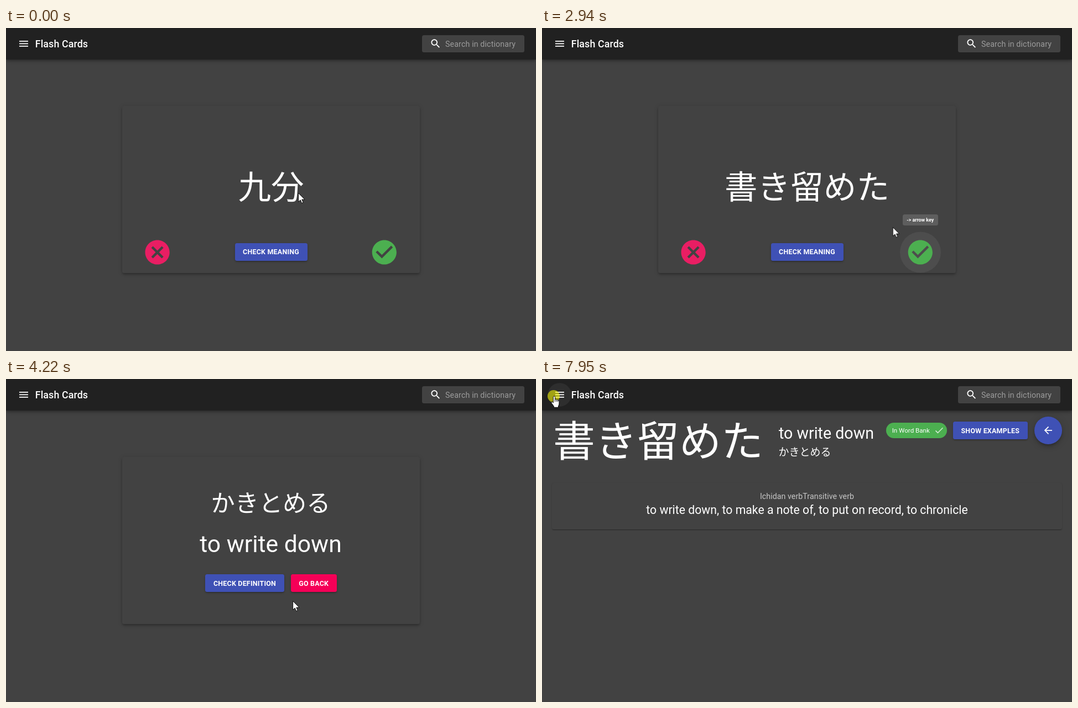
These frames come from a looping animation (958 by 584 pixels, 8000 ms). An HTML page:

```html
<!DOCTYPE html>
<html lang="ja">
<head>
<meta charset="utf-8">
<title>Flash Cards</title>
<style>
  html, body { margin: 0; width: 100%; height: 100%; overflow: hidden; background: #424242; }
  body { font-family: Roboto, sans-serif; color: #fff; }
  #stage { position: absolute; left: 0; top: 0; width: 958px; height: 584px; overflow: hidden; background: #424242; }
  #stage * { animation-duration: 8s; animation-iteration-count: infinite; animation-timing-function: linear; }
  #stage .step { animation-timing-function: step-end; }
  .layer, svg.layer { position: absolute; left: 0; top: 0; width: 958px; height: 584px; }
  .box { position: absolute; box-sizing: border-box; }
  text { fill: #fff; }
  .mid { text-anchor: middle; }
  .jp { font-family: "Noto Sans CJK JP", "Noto Sans CJK", sans-serif; }
  .word { font-size: 59.6px; }

  .bar { left: 0; top: 0; width: 958px; height: 57px; background: #212121;
    box-shadow: 0 2px 4px -1px #0003, 0 3.5px 4.5px #0002, 0 1px 9px #0002; }
  .search { left: 752px; top: 13px; width: 185px; height: 31px; border-radius: 3.5px; background: #424242; }

  /* flip card: each face is hidden once it turns past 90 degrees */
  .scene { perspective: 890px; perspective-origin: 479px 292px; animation-name: scene; }
  #stage .face { transform-origin: 479px 292px; backface-visibility: hidden;
    animation-timing-function: linear, step-end; }
  .front { animation-name: front, frontSide; }
  .back { transform: rotateY(-180deg); animation-name: back, backSide; }
  .card { left: 210px; top: 141px; width: 538px; height: 302px; border-radius: 3.5px; background: #424242;
    box-shadow: 0 2px 4px -1px #0003, 0 3.5px 4.5px #0002, 0 1px 9px #0002; }

  .btn { height: 32px; display: flex; align-items: center; justify-content: center; overflow: hidden;
    border-radius: 3.5px; background: #3f51b5; font-size: 12.44px; font-weight: 600;
    letter-spacing: .018em; white-space: nowrap;
    box-shadow: 0 2.5px 1px -2px #0003, 0 2px 2px #0002, 0 1px 4.5px #0002; }
  .ripple { position: absolute; width: 212px; height: 212px; margin: -106px; border-radius: 50%;
    background: #fff; opacity: .2; transform: scale(0); animation-name: ripple; }
  .meaning { left: 413.5px; top: 388.7px; width: 131px; animation-name: meaning; }
  .define { left: 360px; top: 353px; width: 143px; animation-name: define; }
  .goback { left: 515px; top: 353px; width: 82.5px; background: #f50057; animation-name: goback; }

  .tip { height: 19.5px; display: flex; align-items: center; justify-content: center; border-radius: 3.5px;
    background: #5e5e5e; font-size: 8.9px; font-weight: 700; white-space: nowrap; opacity: 0; }
  .tip.key { left: 652.3px; top: 336.7px; width: 63.5px; animation-name: tipKey; }
  .tip.space { left: 450.7px; top: 357px; width: 54px; animation-name: tipSpace; }

  /* definition page */
  .detail { opacity: 0; animation-name: detail; }
  .entry { opacity: 0; animation-name: entry; }
  .fab { left: 890px; top: 68px; width: 49.5px; height: 49.5px; border-radius: 50%; background: #3f51b5;
    box-shadow: 0 3px 4.5px -1px #0003, 0 5px 9px #0002, 0 1px 16px #0002; }
  .chip { left: 622px; top: 79px; width: 110px; height: 28px; border-radius: 14px; background: #4caf50; }
  .examples { left: 743px; top: 77px; width: 134.5px; }
  .senses { left: 18px; top: 188px; width: 922px; height: 84px; border-radius: 3.5px; background: #424242;
    box-shadow: 0 2px 1px -1px #0003, 0 1px 1px #0002, 0 1px 2.7px #0002; }

  .halo { fill: #fff; fill-opacity: 0; }
  .halo.ok { animation-name: haloOk; }
  .halo.menu { animation-name: haloMenu; }
  .w1 { animation-name: w1; }
  .w2 { fill-opacity: 0; animation-name: w2; }
  .w3 { fill-opacity: 0; animation-name: w3; }

  #stage .cursor { --hand: 0; animation-name: path, hand; animation-timing-function: linear, step-end; }
  .pointer { opacity: calc(1 - var(--hand)); }
  .hand { opacity: var(--hand); }
  .press { fill: #ff0; opacity: 0; animation-name: press; }

  @keyframes path {
    0%, 2.5% { transform: translate(528px, 298px); animation-timing-function: ease-in-out; }
    8.6%, 21.5% { transform: translate(686px, 418px); }
    22.25%, 33.375% { transform: translate(682px, 411px); animation-timing-function: ease-in; }
    36.75% { transform: translate(634px, 360px); }
    39.4% { transform: translate(562px, 321px); }
    42.3% { transform: translate(514px, 396px); animation-timing-function: ease-out; }
    43.4%, 54.5% { transform: translate(518px, 401px); animation-timing-function: ease-in; }
    56.4% { transform: translate(540px, 358px); }
    58.6% { transform: translate(510px, 323px); animation-timing-function: ease-out; }
    61.9%, 76.9% { transform: translate(457px, 365px); animation-timing-function: ease-in-out; }
    78.75%, 87.7% { transform: translate(464px, 418px); animation-timing-function: ease-in-out; }
    89.5%, 91.8% { transform: translate(376px, 302px); animation-timing-function: ease-in-out; }
    98.4%, 100% { transform: translate(22px, 31px); }
  }
  @keyframes hand {
    0% { --hand: 0; } 7.2% { --hand: 1; } 35.4% { --hand: 0; } 42.1% { --hand: 1; }
    47% { --hand: 0; } 55.7% { --hand: 1; } 56.9% { --hand: 0; } 60.6% { --hand: 1; }
    75.6% { --hand: 0; } 97% { --hand: 1; } 100% { --hand: 1; }
  }
  @keyframes press {
    0% { opacity: 0; } 11.5% { opacity: .56; } 12.5% { opacity: 0; }
    25.125% { opacity: .56; } 26.2% { opacity: 0; } 44.125% { opacity: .56; } 44.75% { opacity: 0; }
    73.875% { opacity: .56; } 75% { opacity: 0; } 99.375%, 100% { opacity: .56; }
  }
  @keyframes front {
    0%, 44.79% { transform: rotateY(0deg); animation-timing-function: ease; }
    52.29%, 100% { transform: rotateY(180deg); }
  }
  @keyframes back {
    0%, 44.79% { transform: rotateY(-180deg); animation-timing-function: ease; }
    52.29%, 100% { transform: rotateY(0deg); }
  }
  @keyframes frontSide { 0% { visibility: visible; } 47.03%, 100% { visibility: hidden; } }
  @keyframes backSide { 0% { visibility: hidden; } 47.03%, 100% { visibility: visible; } }
  @keyframes ripple {
    0%, 44.41% { transform: scale(0); animation-timing-function: cubic-bezier(.4, 0, .2, 1); }
    51.3% { transform: scale(1); opacity: .2; }
    54%, 100% { transform: scale(1); opacity: 0; }
  }
  @keyframes meaning { 0%, 41.9% { background: #3f51b5; } 43.4%, 100% { background: #303f9f; } }
  @keyframes define { 0%, 60.5% { background: #3f51b5; } 61.9%, 100% { background: #303f9f; } }
  @keyframes goback { 0%, 55.7%, 59%, 100% { background: #f50057; } 57% { background: #c80048; } }
  @keyframes tipKey {
    0%, 7.2% { opacity: 0; transform: scale(.75); } 8.6%, 36.9% { opacity: 1; transform: none; }
    38.8%, 100% { opacity: 0; transform: scale(.75); }
  }
  @keyframes tipSpace {
    0%, 42% { opacity: 0; transform: scale(.75); } 43.4%, 46.8% { opacity: 1; transform: none; }
    49%, 100% { opacity: 0; transform: scale(.75); }
  }
  @keyframes haloOk { 0%, 7% { fill-opacity: 0; } 8.6%, 36.8% { fill-opacity: .06; } 38.6%, 100% { fill-opacity: 0; } }
  @keyframes haloMenu { 0%, 97% { fill-opacity: 0; } 98.9%, 100% { fill-opacity: .06; } }
  @keyframes w1 { 0% { fill-opacity: 1; } 12.5%, 100% { fill-opacity: 0; } }
  @keyframes w2 { 0% { fill-opacity: 0; } 12.5% { fill-opacity: 1; } 26.2%, 100% { fill-opacity: 0; } }
  @keyframes w3 { 0% { fill-opacity: 0; } 26.2%, 100% { fill-opacity: 1; } }
  @keyframes scene { 0% { opacity: 1; } 75.6%, 100% { opacity: 0; } }
  @keyframes detail { 0% { opacity: 0; } 75.6%, 100% { opacity: 1; } }
  @keyframes entry { 0% { opacity: 0; } 85%, 100% { opacity: 1; } }
</style>
</head>
<body>
<div id="stage">

  <div class="layer scene step">
    <div class="layer face back">
      <div class="box card"></div>
      <svg class="layer" viewBox="0 0 958 584">
        <text class="jp mid" x="478.5" y="240.5" font-size="43.2">かきとめる</text>
        <text class="mid" x="478.5" y="313.5" font-size="42.67">to write down</text>
      </svg>
      <div class="box btn define">CHECK DEFINITION
        <i class="ripple" style="left:96.5px;top:11.5px;animation-delay:-5620ms"></i></div>
      <div class="box btn goback">GO BACK</div>
    </div>
    <div class="layer face front">
      <div class="box card"></div>
      <svg class="layer" viewBox="0 0 958 584">
        <g class="jp mid word">
          <text class="w1 step" x="479" y="309">九分</text>
          <text class="w2 step" x="479" y="309">会い</text>
          <text class="w3 step" x="479" y="309">書き留めた</text>
        </g>
        <circle class="halo ok" cx="684" cy="405.5" r="37"/>
        <path transform="translate(247.1 379) scale(2.21)" fill="#e91e63" d="M12 2C6.47 2 2 6.47 2 12s4.47 10 10 10 10-4.47 10-10S17.53 2 12 2zm5 13.59L15.59 17 12 13.41 8.41 17 7 15.59 10.59 12 7 8.41 8.41 7 12 10.59 15.59 7 17 8.41 13.41 12 17 15.59z"/>
        <path transform="translate(657.3 379) scale(2.21)" fill="#4caf50" d="M12 2C6.48 2 2 6.48 2 12s4.48 10 10 10 10-4.48 10-10S17.52 2 12 2zm-2 15l-5-5 1.41-1.41L10 14.17l7.59-7.59L19 8l-9 9z"/>
      </svg>
      <div class="box btn meaning">CHECK MEANING
        <i class="ripple" style="left:104.5px;top:12.5px"></i></div>
    </div>
  </div>

  <div class="layer detail step">
    <div class="box fab"></div>
    <svg class="layer" viewBox="0 0 958 584">
      <path transform="translate(904.2 82.2) scale(.889)" fill="#fff" d="M20 11H7.83l5.59-5.59L12 4l-8 8 8 8 1.41-1.41L7.83 13H20v-2z"/>
    </svg>
    <div class="layer entry step">
      <div class="box chip"></div>
      <div class="box btn examples">SHOW EXAMPLES</div>
      <div class="box senses"></div>
      <svg class="layer" viewBox="0 0 958 584">
        <text class="jp" x="20" y="140" font-size="76">書き留めた</text>
        <text x="428" y="108" font-size="28.6">to write down</text>
        <text class="jp" x="427.5" y="138.5" font-size="19">かきとめる</text>
        <text x="632.7" y="96.5" font-size="11.6">In Word Bank</text>
        <path transform="translate(708.2 83.2) scale(.8)" fill="#fff" opacity=".75" d="M9 16.2L4.8 12l-1.4 1.4L9 19 21 7l-1.4-1.4L9 16.2z"/>
        <text class="mid" x="479" y="216.5" font-size="14.22" letter-spacing=".05" style="fill:#c6c6c6">Ichidan verbTransitive verb</text>
        <text class="mid" x="479" y="244" font-size="21.25">to write down, to make a note of, to put on record, to chronicle</text>
      </svg>
    </div>
  </div>

  <div class="box bar"></div>
  <div class="box search"></div>
  <svg class="layer" viewBox="0 0 958 584">
    <circle class="halo menu" cx="31.8" cy="28.5" r="21.3"/>
    <path transform="translate(21.3 17.7) scale(.889)" fill="#fff" d="M3 18h18v-2H3v2zm0-5h18v-2H3v2zm0-7v2h18V6H3z"/>
    <text x="52.8" y="34.5" font-size="17.78" font-weight="500" letter-spacing=".13">Flash Cards</text>
    <path transform="translate(765.8 17.5) scale(.889)" fill="#fff" d="M15.5 14h-.79l-.28-.27C15.41 12.59 16 11.11 16 9.5 16 5.91 13.09 3 9.5 3S3 5.91 3 9.5 5.91 16 9.5 16c1.61 0 3.09-.59 4.23-1.57l.27.28v.79l5 4.99L20.49 19l-4.99-5zm-6 0C7.01 14 5 11.99 5 9.5S7.01 5 9.5 5 14 7.01 14 9.5 11.99 14 9.5 14z"/>
    <text x="794" y="33.7" font-size="14.22" letter-spacing=".133" style="fill:#9c9c9c">Search in dictionary</text>
  </svg>

  <div class="box tip key">-&gt; arrow key</div>
  <div class="box tip space">space bar</div>

  <svg class="layer" viewBox="0 0 958 584">
    <g class="cursor" stroke="#000" stroke-width=".9" stroke-linejoin="round">
      <circle class="press step" cx="-1" r="11" stroke="none"/>
      <path class="pointer" fill="#fff" d="M.6 .5V16.3L4.2 13 6.6 18.6 9.2 17.5 6.8 12.1H12Z"/>
      <g class="hand">
        <path fill="#fff" d="M-1.6 1.5Q-1.6 0 0 0T1.6 1.5V6Q3.4 5 4.4 6.6 6.2 5.9 6.8 7.4 9 7 9 9V13Q9 16 7.5 18V20.3H-.5V18.5L-4.8 12.5Q-5.6 10.6-4 10.2-2.6 10-1.6 12Z"/>
        <path fill="none" d="M1.6 6v4M4.4 6.6v3.4M6.8 7.4v3"/>
      </g>
    </g>
  </svg>
</div>
</body>
</html>
```
